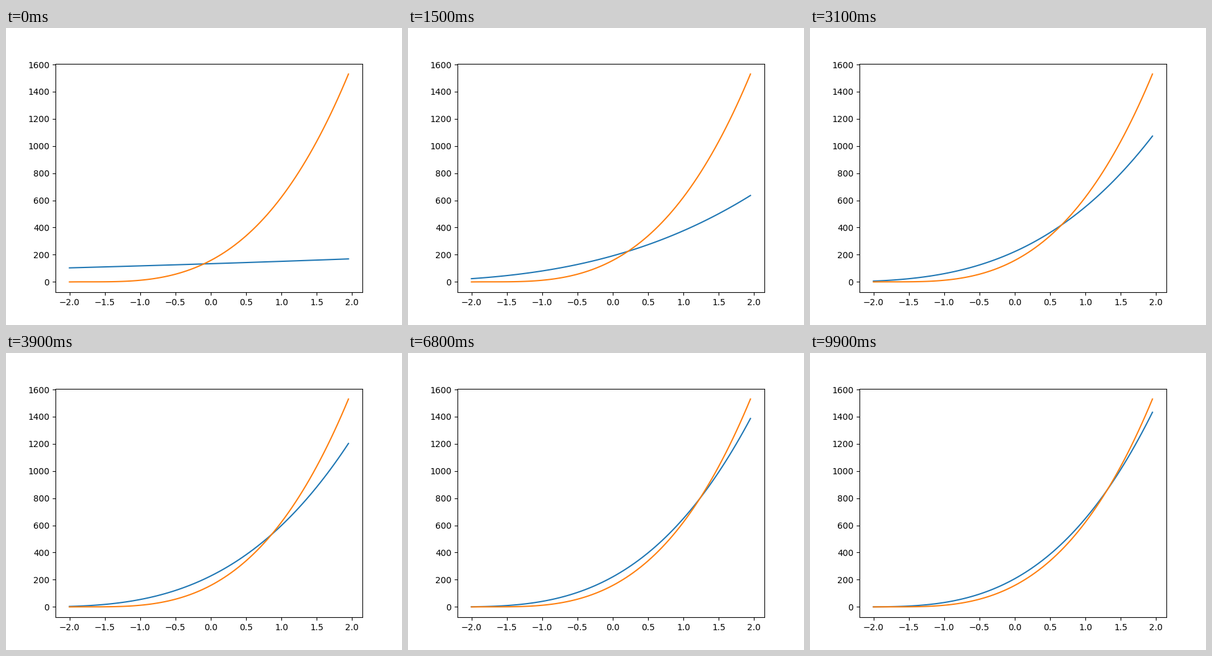
A matplotlib script that plays this animation: 640x480 px, repeating every 10 s.

```python
import numpy as np
import matplotlib.pyplot as plt
from matplotlib.animation import FuncAnimation

FRAMES = 100
INTERVAL = 100
RATE = 3e-6

x = np.arange(-2, 2, 0.05)


def cube(w, b):
    return (w * x + b) ** 3


goal = cube(3.14, 5.4)


def train(w, b, steps):
    """Delta rule on a cubic unit; returns the fitted curve after each step."""
    curves = []
    for _ in range(steps):
        err = goal - cube(w, b)
        w += RATE * np.sum(err * x)
        b += RATE * np.sum(err)
        curves.append(cube(w, b))
    return curves


# The first step happens before the animation starts.
fits = train(0.0, 5.0, FRAMES + 1)[1:]

fig, ax = plt.subplots(figsize=(6.4, 4.8), dpi=100)
fit_line, = ax.plot(x, fits[0])
ax.plot(x, goal)


def update(i):
    fit_line.set_ydata(fits[i])
    return fit_line,


anim = FuncAnimation(fig, update, frames=FRAMES, interval=INTERVAL,
                     repeat=True, repeat_delay=0)
plt.show()
```
